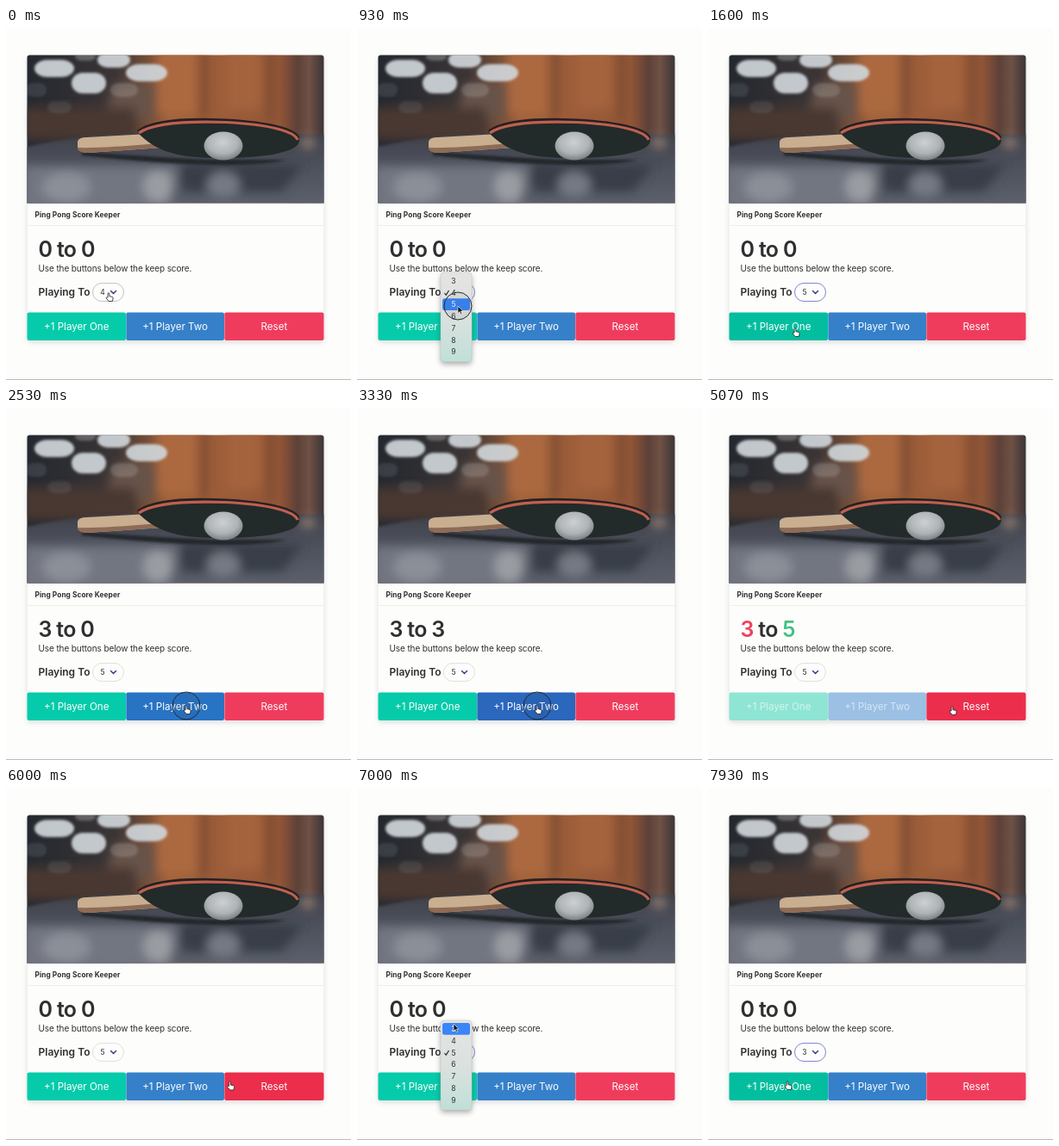
Write an HTML page that moves like this. It is 400 by 409 pixels and loops after 8 s.

```html
<!DOCTYPE html>
<html lang="en">
<head>
<meta charset="utf-8">
<title>Score Keeper</title>
<style>
  html, body { margin: 0; width: 100%; height: 100%; overflow: hidden; background: #fdfdfc; }
  svg { display: block; width: 100%; height: 100%; font-family: Inter, "Open Sans", sans-serif; }
  text { fill: #2f2f30; white-space: pre; }
  .label { font-size: 11.6px; text-anchor: middle; fill: #fff; }
  .option { font-size: 8.5px; text-anchor: middle; }
</style>
</head>
<body>
<svg viewBox="0 0 400 409">
  <defs>
    <filter id="soft" x="-30%" y="-30%" width="160%" height="160%"><feGaussianBlur stdDeviation="1.5"/></filter>
    <filter id="haze" x="-50%" y="-50%" width="200%" height="200%"><feGaussianBlur stdDeviation="6"/></filter>
    <filter id="shadow" x="-20%" y="-20%" width="140%" height="140%"><feGaussianBlur stdDeviation="3"/></filter>
    <clipPath id="frame"><path d="M24.5 203.5V34.5q0-3 3-3H365.5q3 0 3 3V203.5z"/></clipPath>
    <linearGradient id="wall">
      <stop offset="0" stop-color="#23282f"/><stop offset=".3" stop-color="#3b3535"/>
      <stop offset=".42" stop-color="#7d5238"/><stop offset=".48" stop-color="#a3623a"/>
      <stop offset=".85" stop-color="#935637"/><stop offset=".91" stop-color="#5d4138"/>
      <stop offset=".95" stop-color="#6f5145"/><stop offset="1" stop-color="#3a3436"/>
    </linearGradient>
    <linearGradient id="table" x2="0" y2="1">
      <stop offset="0" stop-color="#3e3f48"/><stop offset=".35" stop-color="#4a4e59"/>
      <stop offset="1" stop-color="#5d616d"/>
    </linearGradient>
    <linearGradient id="menuFill" x2="0" y2="1">
      <stop offset="0" stop-color="#e4e4e3"/><stop offset=".5" stop-color="#dbe1de"/>
      <stop offset="1" stop-color="#bfe0d8"/>
    </linearGradient>
    <radialGradient id="ballFill" cx=".48" cy=".38" r=".65">
      <stop offset="0" stop-color="#cdd0d3"/><stop offset=".6" stop-color="#aeb3b5"/>
      <stop offset="1" stop-color="#747a7b"/>
    </radialGradient>
  </defs>

  <rect width="400" height="409" fill="#fdfdfc"/>
  <path d="M0 408.5H400" stroke="#bdbbbd"/>

  <rect x="25" y="35" width="343" height="330" rx="3" fill="#55555f" opacity=".22" filter="url(#shadow)"/>
  <rect x="24.5" y="31.5" width="344" height="331.5" rx="3" fill="#fdfdfc" stroke="#f0f0e8" stroke-width=".7"/>

  <g clip-path="url(#frame)">
    <rect x="24" y="31" width="345" height="173" fill="url(#wall)"/>
    <g filter="url(#haze)">
      <path d="M125 65H172V105H115z" fill="#67524a"/>
      <path d="M20 92H150V130H20z" fill="#493833"/>
      <path d="M176 25H222V100H176z" fill="#ac693f"/>
      <path d="M224 25H234V105H224zM303 25H311V110H303z" fill="#7d4b31"/>
      <path d="M255 25H295V95H255z" fill="#a5633c"/>
    </g>
    <g id="lights" filter="url(#soft)"></g>
    <path d="M20 139Q90 122 190 122T375 124V210H20z" fill="url(#table)" filter="url(#soft)"/>
    <g filter="url(#haze)">
      <path d="M20 160H200L190 210H20z" fill="#727680"/>
      <ellipse cx="70" cy="185" rx="28" ry="17" fill="#8b8f98"/>
      <ellipse cx="176" cy="184" rx="17" ry="18" fill="#9a9ca2"/>
      <path d="M200 158H345L320 190H205z" fill="#393c46"/>
      <ellipse cx="252" cy="182" rx="19" ry="15" fill="#747983"/>
      <ellipse cx="350" cy="133" rx="9" ry="7" fill="#907a70"/>
    </g>
    <path d="M88 144Q150 148 230 153H325Q300 160 240 159T88 148z" fill="#22262b" filter="url(#soft)"/>
    <path d="M83 132Q84 127 94 127L165 123 181 139 95 145Q83 145 83 138z" fill="#c9ae90"/>
    <path d="M83 139Q110 140 176 134L181 139 95 145Q83 145 83 139z" fill="#8e6b55"/>
    <path d="M152 121C164 108 205 105 251 107C307 109 341 119 340 131C339 145 297 152 239 151C199 150 174 144 152 121z" fill="#222a2a"/>
    <path d="M153 120C170 107 212 105 255 107C307 110 337 118 339 128" fill="none" stroke="#262022" stroke-width="3"/>
    <path d="M154 122C171 109.500 212 108 255 109.500C305 112 335 120 338 130" fill="none" stroke="#c0604f" stroke-width="3.200"/>
    <ellipse cx="252" cy="137" rx="22.500" ry="16.500" fill="url(#ballFill)"/>
  </g>

  <text x="33.5" y="219.5" font-size="8.3" font-weight="700" letter-spacing=".07">Ping Pong Score Keeper</text>
  <path d="M25 229.500H368" stroke="#efefe2" stroke-width="1"/>
  <text id="score" x="37.5" y="266" font-size="25" font-weight="600" letter-spacing="-.7"><tspan></tspan><tspan> to </tspan><tspan></tspan></text>
  <text x="37.5" y="283" font-size="10" letter-spacing="-.11">Use the buttons below the keep score.</text>
  <text x="37.5" y="311" font-size="12" font-weight="600">Playing To</text>

  <rect id="select" x="100.5" y="296.5" width="36" height="21" rx="10.5" fill="#fdfdfc"/>
  <text id="limit" class="option" x="112" y="310"></text>
  <path d="M121.5 305.5L124.5 308.5 127.5 305.5" fill="none" stroke="#36408a" stroke-width="1.5" stroke-linecap="round"/>

  <g id="buttons"></g>
  <g id="menu">
    <rect x="97" y="3" width="36" height="104" rx="4" fill="#333" opacity=".4" filter="url(#shadow)"/>
    <rect x="97" width="36" height="104" rx="4" fill="url(#menuFill)" stroke="#c3c5c4" stroke-width=".5"/>
    <rect id="highlight" x="99" width="32" height="13.8" rx="2.5" fill="#3b85f6"/>
    <path id="check" d="M101.5 0L103.3 2.3 106.5 -3" fill="none" stroke-width="1.2"/>
    <g id="options"></g>
  </g>

  <g id="cursor">
    <circle id="ring" r="16" fill="#222" fill-opacity=".06" stroke="#24292c" stroke-width="1"/>
    <path id="hand" d="M-.9 5V.6a.9.9 0 0 1 1.8 0V3.6l3.2.8q1.2.4 1 1.6L4.4 9.5H.2L-2.8 6q-.3-1.2.8-1z" fill="#fff" stroke="#20201c" stroke-width=".8"/>
    <path id="arrow" d="M0 0V8.5l2-1.9 1.3 3 1.4-.6-1.3-2.9H6z" fill="#111" stroke="#fff" stroke-width=".6"/>
  </g>
</svg>
<script>
const LOOP = 8000, ROW = 13.75, FIRST = 3, ROWS = 7;
const $ = id => document.getElementById(id);

function add(parent, tag, attrs, text = '') {
  const node = document.createElementNS('http://www.w3.org/2000/svg', tag);
  set(node, attrs);
  node.textContent = text;
  parent.append(node);
  return node;
}
function set(node, attrs) {
  for (const key in attrs) node.setAttribute(key, attrs[key]);
}
const show = (node, on) => set(node, { visibility: on ? 'visible' : 'hidden' });

// Out-of-focus lamps: centre x, y, half width, half height, opacity
[[56, 47, 23, 10, .92], [125, 37, 19, 9, .92], [163, 52, 24, 10, .92], [96, 64, 20, 12, .92],
 [92, 33, 12, 5, .3], [35, 72, 12, 8, .12], [137, 72, 16, 8, .2], [62, 92, 14, 7, .1]]
  .forEach(([x, y, w, h, opacity]) => add($('lights'), 'rect',
    { x: x - w, y: y - h, width: 2 * w, height: 2 * h, rx: w * .65, ry: h, opacity, fill: '#d0d5da' }));

const buttons = [
  { text: '+1 Player One', x: 24.5, w: 114.5, fill: '#05cbaa', hover: '#02be9f', focus: '#02b89a', off: '#8fe5d3' },
  { text: '+1 Player Two', x: 139.3, w: 113.7, fill: '#3580c9', hover: '#2873c4', focus: '#2a67bd', off: '#9bc0e4' },
  { text: 'Reset', x: 253.3, w: 115.2, fill: '#f03c5c', hover: '#ec2d4c', focus: '#e62c4a' }
];
for (const b of buttons) {
  b.box = add($('buttons'), 'rect', { x: b.x, y: 330.5, width: b.w, height: 32.5, rx: 2 });
  b.label = add($('buttons'), 'text', { class: 'label', x: b.x + b.w / 2, y: 351.2 }, b.text);
}
const options = Array.from({ length: ROWS }, (_, i) =>
  add($('options'), 'text', { class: 'option', x: 112, y: 13 + i * ROW }, FIRST + i));

// Pointer tip: time, x, y
const path = [
  [0, 119, 308], [200, 119, 308], [560, 117, 323], [1070, 117, 323], [1580, 101, 349],
  [2230, 101, 349], [2460, 209, 346], [3930, 209, 346], [4530, 283, 347], [5870, 283, 347],
  [6420, 119, 308], [6850, 119, 308], [6990, 112, 274], [7330, 112, 274], [7900, 92, 341], [LOOP, 92, 341]
];
const hitsOne = [1860, 2030, 2200], hitsTwo = [2600, 2870, 3140, 3400, 3660], RESET = 5200;
const clicks = [130, 1000, ...hitsOne, ...hitsTwo, RESET, 6530, 7200];

function pointer(t) {
  const i = path.findIndex((p, k) => k && t <= p[0]);
  const [t0, x0, y0] = path[i - 1], [t1, x1, y1] = path[i];
  const u = (t - t0) / (t1 - t0), e = u * u * (3 - 2 * u);
  return [x0 + (x1 - x0) * e, y0 + (y1 - y0) * e];
}

function draw(t) {
  const [x, y] = pointer(t);
  const limit = t < 1040 ? 4 : t < 7240 ? 5 : 3;
  const open = (t > 140 && t < 1040) || (t > 6560 && t < 7240);
  const count = hits => t < RESET ? hits.filter(h => h <= t).length : 0;
  const points = [count(hitsOne), count(hitsTwo)];
  const over = Math.max(...points) === 5;

  const parts = $('score').children;
  points.forEach((p, i) => {
    parts[i * 2].textContent = p;
    parts[i * 2].style.fill = !over ? '' : p === 5 ? '#42c184' : '#ee405c';
  });

  const onSelect = x > 100 && x < 137 && y > 296 && y < 318;
  const focused = (t > 130 && t < hitsOne[0]) || t > 6530;
  set($('select'), { stroke: focused ? '#8286d2' : onSelect ? '#c4c4c6' : '#e0e0dc' });
  $('limit').textContent = limit;

  let onButton = false;
  buttons.forEach((b, i) => {
    const inside = !open && y > 331 && y < 363 && x >= b.x && x < b.x + b.w;
    const disabled = over && i < 2;
    const active = inside && points[i] > 0;
    onButton ||= inside && !disabled;
    set(b.box, { fill: disabled ? b.off : active ? b.focus : inside ? b.hover : b.fill });
    set(b.label, { 'fill-opacity': disabled ? .6 : 1 });
  });

  show($('menu'), open);
  const top = 270 - (limit - 5) * ROW;
  const row = Math.min(ROWS - 1, Math.max(0, Math.floor((y - top - 3) / ROW)));
  set($('menu'), { transform: `translate(0 ${top})` });
  set($('highlight'), { y: 3 + row * ROW });
  set($('check'), { transform: `translate(0 ${10.5 + (limit - FIRST) * ROW})`, stroke: row === limit - FIRST ? '#fff' : '#252620' });
  options.forEach((o, i) => o.style.fill = i === row ? '#fff' : '');

  const hand = !open && (onSelect || onButton);
  set($('cursor'), { transform: `translate(${x} ${y})` });
  show($('hand'), hand);
  show($('arrow'), !hand);
  show($('ring'), clicks.some(c => t > c - 110 && t < c + 70) && t > 70);
}

function tick(now) {
  draw(now % LOOP);
  requestAnimationFrame(tick);
}
draw(0);
requestAnimationFrame(tick);
</script>
</body>
</html>
```
